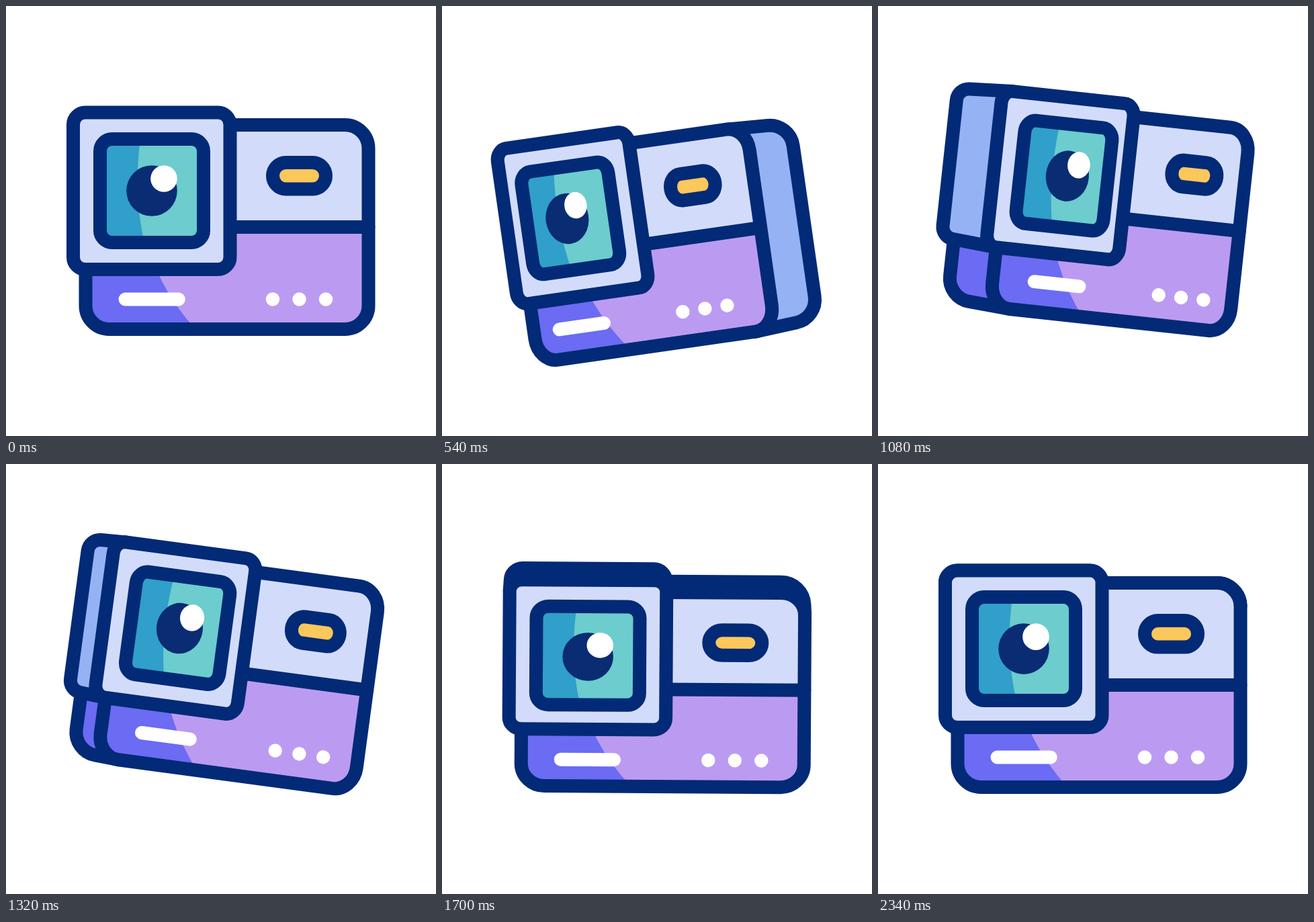
An HTML page with a canvas that plays this animation: 640 px wide and 640 px high, repeating every 2400 ms.

```html
<!DOCTYPE html>
<html lang="en">
<head>
<meta charset="utf-8">
<title>Camera</title>
<style>
  html, body { margin: 0; width: 100%; height: 100%; overflow: hidden; background: #fff; }
  canvas { display: block; width: 640px; height: 640px; }
</style>
</head>
<body>
<canvas id="stage"></canvas>
<script>
const canvas = document.getElementById('stage');
const ctx = canvas.getContext('2d');
const ratio = window.devicePixelRatio || 1;
canvas.width = canvas.height = 640 * ratio;

const LOOP = 2400;
const NAVY = '#032a76', PALE = '#d2dcfa', SIDE = '#95b2f4', LILAC = '#bb9bf1', INDIGO = '#6b6bf3';
const BODY = { l: 118.5, t: 177, r: 539.5, b: 481, rad: 35 };
const BOX = { l: 100, t: 158.5, r: 333.5, b: 392, rad: 18 };
const FRAME = { l: 140, t: 198, r: 294, b: 352, rad: 18 };
const SLOT = { l: 397, t: 233, r: 476, b: 272.5, rad: 19.7 };
const SQUEEZE = 0.155;

// [time, value] keys, eased in and out
const TILT = [[100, 0], [690, -9.7], [1170, 7.8], [1280, 7.8], [1760, 0]];
const TURN = [[100, 0], [350, 1], [533, 1], [867, 0], [1100, -1], [1167, -1], [1500, 0]];
const NOD = [[1600, 0], [1867, 1], [2000, 1], [2350, 0]];

function track(keys, t) {
  if (t <= keys[0][0]) return keys[0][1];
  for (let i = 1; i < keys.length; i++) {
    const [t0, v0] = keys[i - 1], [t1, v1] = keys[i];
    if (t < t1) {
      const p = (t - t0) / (t1 - t0);
      return v0 + (v1 - v0) * p * p * (3 - 2 * p);
    }
  }
  return keys[keys.length - 1][1];
}

let turn = 0, nod = 0;

// Position on the squeezed front face; kx, ky push raised parts further
function place(x, y, kx = 0, ky = kx) {
  const ax = turn > 0 ? BODY.l : BODY.r;
  return [
    ax + (x - ax) * (1 - SQUEEZE * Math.abs(turn)) - turn * kx,
    BODY.b + (y - BODY.b) * (1 - SQUEEZE * nod) + nod * ky
  ];
}

// Path built in squeezed space, so strokes keep their width
function shape(build, kx, ky) {
  const [ox, oy] = place(0, 0, kx, ky);
  ctx.save();
  ctx.transform(1 - SQUEEZE * Math.abs(turn), 0, 0, 1 - SQUEEZE * nod, ox, oy);
  ctx.beginPath();
  build();
  ctx.restore();
}

function fill(color) { ctx.fillStyle = color; ctx.fill(); }

function stroke(color = NAVY) {
  ctx.strokeStyle = color;
  ctx.stroke();
}

const rounded = o => () => ctx.roundRect(o.l, o.t, o.r - o.l, o.b - o.t, o.rad);
const disc = (x, y, r) => () => ctx.arc(x, y, r, 0, Math.PI * 2);

function clipped(o, k, paint) {
  ctx.save();
  shape(rounded(o), k);
  ctx.clip();
  paint();
  ctx.restore();
}

// Side wall between the back outline and the front face
function wall(o, color) {
  const n = Math.abs(turn);
  if (!n && !nod) return;
  const l = o.l + 6.5 * nod, r = o.r - 6.5 * nod;
  const t = o.t + 4.5 * n - 4 * nod, b = o.b - 7 * n;
  let pts;
  if (nod) {
    pts = [place(o.l, o.t + o.rad), [l, t], [r, t], place(o.r, o.t + o.rad)];
  } else {
    const x = turn > 0 ? r : l, fx = turn > 0 ? o.r - o.rad : o.l + o.rad;
    pts = [place(fx, o.t), [x, t], [x, b], place(fx, o.b)];
  }
  ctx.beginPath();
  ctx.moveTo(...pts[0]);
  ctx.arcTo(...pts[1], ...pts[2], o.rad);
  ctx.arcTo(...pts[2], ...pts[3], o.rad);
  ctx.lineTo(...pts[3]);
  fill(color);
  stroke();
}

function drawBody() {
  wall(BODY, turn < 0 ? INDIGO : SIDE);
  clipped(BODY, 0, () => {
    shape(() => ctx.rect(100, 160, 460, 170));
    fill(PALE);
    shape(() => ctx.rect(100, 329, 460, 170));
    fill(LILAC);
    shape(() => {
      ctx.moveTo(100, 329);
      ctx.lineTo(205, 329);
      ctx.quadraticCurveTo(220, 413, 282, 481);
      ctx.lineTo(100, 481);
    });
    fill(INDIGO);
  });
  shape(() => { ctx.moveTo(BODY.l, 329); ctx.lineTo(BODY.r, 329); });
  stroke();
  shape(rounded(BODY));
  stroke();

  shape(rounded(SLOT), turn > 0 ? 4 : 12, 8);
  fill('#fcc75b');
  stroke();
  shape(() => { ctx.moveTo(177.5, 436.5); ctx.lineTo(256.8, 436.5); }, 12, 9);
  stroke('#fff');
  for (const x of [397, 436.5, 476]) {
    ctx.beginPath();
    ctx.arc(...place(x, 436.5, 12, 9), 10.2, 0, Math.PI * 2);
    fill('#fff');
  }
}

function drawLens() {
  const k = turn > 0 ? 2 : 0;
  if (turn <= 0) wall(BOX, SIDE);
  shape(rounded(BOX), k, 0);
  fill(PALE);
  stroke();
  clipped(FRAME, 5.5, () => {
    shape(rounded(FRAME), 5.5);
    fill('#6cccce');
    shape(() => {
      ctx.moveTo(130, 198);
      ctx.lineTo(200, 198);
      ctx.quadraticCurveTo(189, 282, 206, 352);
      ctx.lineTo(130, 352);
    }, 5.5);
    fill('#309fc9');
  });
  shape(rounded(FRAME), 5.5);
  stroke();
  shape(disc(217, 275, 37.8), 10.5);
  fill('#092c73');
  shape(disc(235, 257, 19.8), 10.5);
  fill('#fff');
}

function draw(t) {
  const tilt = track(TILT, t);
  turn = track(TURN, t);
  nod = track(NOD, t);
  ctx.setTransform(ratio, 0, 0, ratio, 0, 0);
  ctx.fillStyle = '#fff';
  ctx.fillRect(0, 0, 640, 640);
  ctx.lineWidth = 20;
  ctx.lineCap = ctx.lineJoin = 'round';
  ctx.translate(482 + Math.min(0, tilt) * 0.25, 316);
  ctx.rotate(tilt * Math.PI / 180);
  ctx.translate(-482, -316);
  drawBody();
  drawLens();
}

let start;
function tick(now) {
  if (start === undefined) start = now;
  draw((now - start) % LOOP);
  requestAnimationFrame(tick);
}
draw(0);
requestAnimationFrame(tick);
</script>
</body>
</html>
```
